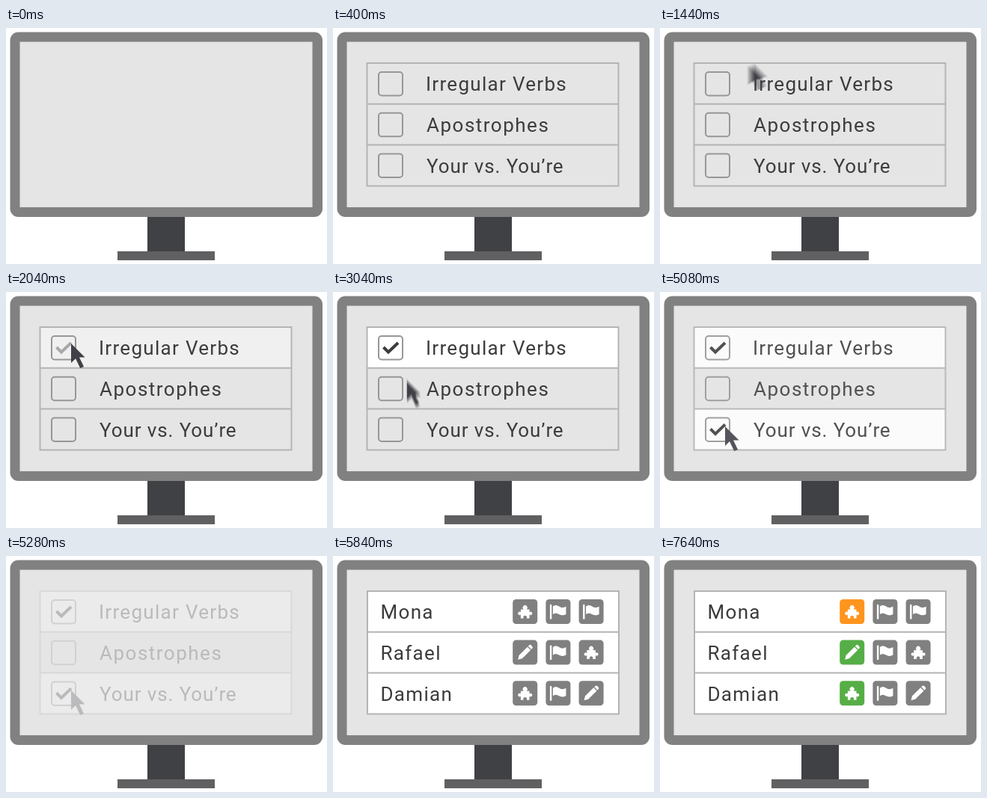
Animation of 429 by 316 pixels, one loop 8 s. Source, as an HTML page:

```html
<!DOCTYPE html>
<html lang="en">
<head>
<meta charset="utf-8">
<title>Lesson checklist</title>
<style>
  html, body { margin: 0; width: 100%; height: 100%; overflow: hidden; background: #fff; }
  svg { display: block; width: 100vw; height: 100vh; }
  text { font: 400 26px Roboto, "Open Sans", sans-serif; letter-spacing: 1.3px; fill: #3c3c3f; }
  .line { fill: none; stroke: #b4b4b4; stroke-width: 2; }
  .box { fill: none; stroke: #979797; stroke-width: 2; }
  .tick { fill: none; stroke: #3c3c3f; stroke-width: 4; }
  #pointer { isolation: isolate; }
  #pointer path { fill: #3c3d41; mix-blend-mode: plus-lighter; }
</style>
</head>
<body>
<svg viewBox="0 0 429 316">
  <defs><clipPath id="screen"><rect x="18.5" y="18.5" width="391" height="221.5"/></clipPath></defs>
  <rect x="189" y="252" width="50" height="48" fill="#404144"/>
  <rect x="149" y="299" width="130" height="12" fill="#606062"/>
  <rect x="5.5" y="5.5" width="417.5" height="247.5" rx="11" fill="#818181"/>
  <rect x="18.5" y="18.5" width="391" height="221.5" fill="#e5e5e5"/>
  <g clip-path="url(#screen)">
    <g id="lessons"></g>
    <g id="people"></g>
  </g>
</svg>
<script>
const LOOP = 8000, STEP = 40, GHOSTS = 8, SHUTTER = 20;
const GREY = '#808080', ORANGE = '#ff941e', GREEN = '#56ae46';
const $ = id => document.getElementById(id);
const rowTop = i => 47 + i * 54.8;

const glyphs = {
  puzzle: 'M-5.8-3H-1.8A3 3 0 1 1 1.8-3H5.8V.8A2.2 2.2 0 1 1 5.8 4V9H2A2.4 2.4 0 1 0-2 9H-5.8V4A2.2 2.2 0 1 1-5.8.8Z',
  flag: 'M-11-8.5a1.2 1.2 0 0 1 2.4 0V10H-11ZM-7-7C-3-10 0-8 2-6.5S7-5 10.5-7V3.5C7 5.5 4 5 1 3.5S-4 1.5-7 3.5Z',
  pencil: 'M-13.5 0L-8.5-3H7.5V3H-8.5ZM8.8-3H10.5Q12.5-3 12.5-1V1Q12.5 3 10.5 3H8.8Z'
};

const lessons = ['Irregular Verbs', 'Apostrophes', 'Your vs. You’re'];
const people = [
  { name: 'Mona', icons: ['puzzle', 'flag', 'flag'], lit: ORANGE, at: 6600 },
  { name: 'Rafael', icons: ['pencil', 'flag', 'puzzle'], lit: GREEN, at: 7120 },
  { name: 'Damian', icons: ['puzzle', 'flag', 'pencil'], lit: GREEN, at: 7640 }
];

const grid = x => `<path class="line" d="M${x} 47H${x + 336}V211.5H${x}ZM${x} ${rowTop(1)}h336M${x} ${rowTop(2)}h336"/>`;
const whiteRow = (x, i) => `<rect x="${x}" y="${rowTop(i)}" width="336" height="54.8" fill="#fff"/>`;
const label = (text, x, i, gap = 1.3) =>
  `<text x="${x}" y="${84 + i * 55}" style="letter-spacing:${gap}px">${text}</text>`;

function checkbox(i) {
  const y = 59 + i * 54.7;
  return `<rect class="box" x="61" y="${y}" width="32" height="31.5" rx="4"/>`;
}

function icon(kind, row, col) {
  const turn = kind === 'pencil' ? ' rotate(-45)' : '';
  return `<g transform="translate(${256.7 + col * 44.2} ${74.5 + row * 54.6})">
    <rect x="-16.5" y="-16.5" width="33" height="33" rx="4.5" fill="${GREY}" ${col ? '' : `id="lit${row}"`}/>
    <path d="${glyphs[kind]}" fill="#fff" transform="${turn}"/></g>`;
}

$('lessons').innerHTML =
  [0, 2].map(i => `<g id="mark${i}">${whiteRow(45.5, i)}</g>`).join('') +
  grid(45.5) +
  lessons.map((s, i) => checkbox(i) + label(s, i ? 125 : 124, i, [1.3, 1.5, 0.9][i])).join('') +
  [0, 2].map(i => `<path class="tick" id="tick${i}" d="M67.5 ${74 + i * 54.7}l6.5 6.5L87 ${68 + i * 54.7}"/>`).join('') +
  '<g id="pointer">' +
  `<path d="M0 0V26L6 20L12.2 33L17 31L11 18.5H18.5Z" opacity="${1 / GHOSTS}"/>`.repeat(GHOSTS) + '</g>';

$('people').innerHTML =
  people.map((p, i) => whiteRow(46, i)).join('') + grid(46) +
  people.map((p, i) => label(p.name, 63.5, i) + p.icons.map((k, c) => icon(k, i, c)).join('')).join('');

const ghosts = [...$('pointer').children];

// Progress of a change whose first visible step is at `start`
const ramp = (t, start, steps) => Math.min(1, Math.max(0, (t - start + STEP) / (steps * STEP)));
const quad = p => p < .5 ? 2 * p * p : 1 - 2 * (1 - p) ** 2;
const smooth = p => p * p * (3 - 2 * p);
const curve = (p, a, b, c) => a.map((v, k) => v * (1 - p) ** 2 + 2 * b[k] * p * (1 - p) + c[k] * p * p);

function pointerAt(t) {
  return t < 2400
    ? curve(quad(ramp(t, 1080, 14)), [412, 40], [180, -2], [87, 69])
    : curve(smooth(ramp(t, 2880, 11)), [87, 69], [111, 130], [87, 180]);
}

function draw(ms) {
  const t = Math.floor(ms % LOOP / STEP) * STEP;
  $('lessons').setAttribute('opacity', ramp(t, 120, 8) - ramp(t, 5080, 8));
  $('people').setAttribute('opacity', ramp(t, 5560, 8));
  [[0, 2000], [2, 3640]].forEach(([i, start]) => {
    const p = ramp(t, start, 5);
    $('mark' + i).setAttribute('opacity', p);
    $('tick' + i).setAttribute('opacity', p);
  });
  const moving = (t >= 1080 && t < 1600) || (t >= 2880 && t < 3280);
  ghosts.forEach((g, i) => {
    const lag = moving ? (i / (GHOSTS - 1) - .5) * SHUTTER : 0;
    g.setAttribute('transform', `translate(${pointerAt(t + lag).map(v => v.toFixed(2))})`);
  });
  people.forEach((p, i) => $('lit' + i).setAttribute('fill', t >= p.at ? p.lit : GREY));
}

const begin = performance.now();
function tick() {
  draw(performance.now() - begin);
  requestAnimationFrame(tick);
}
tick();
</script>
</body>
</html>
```
